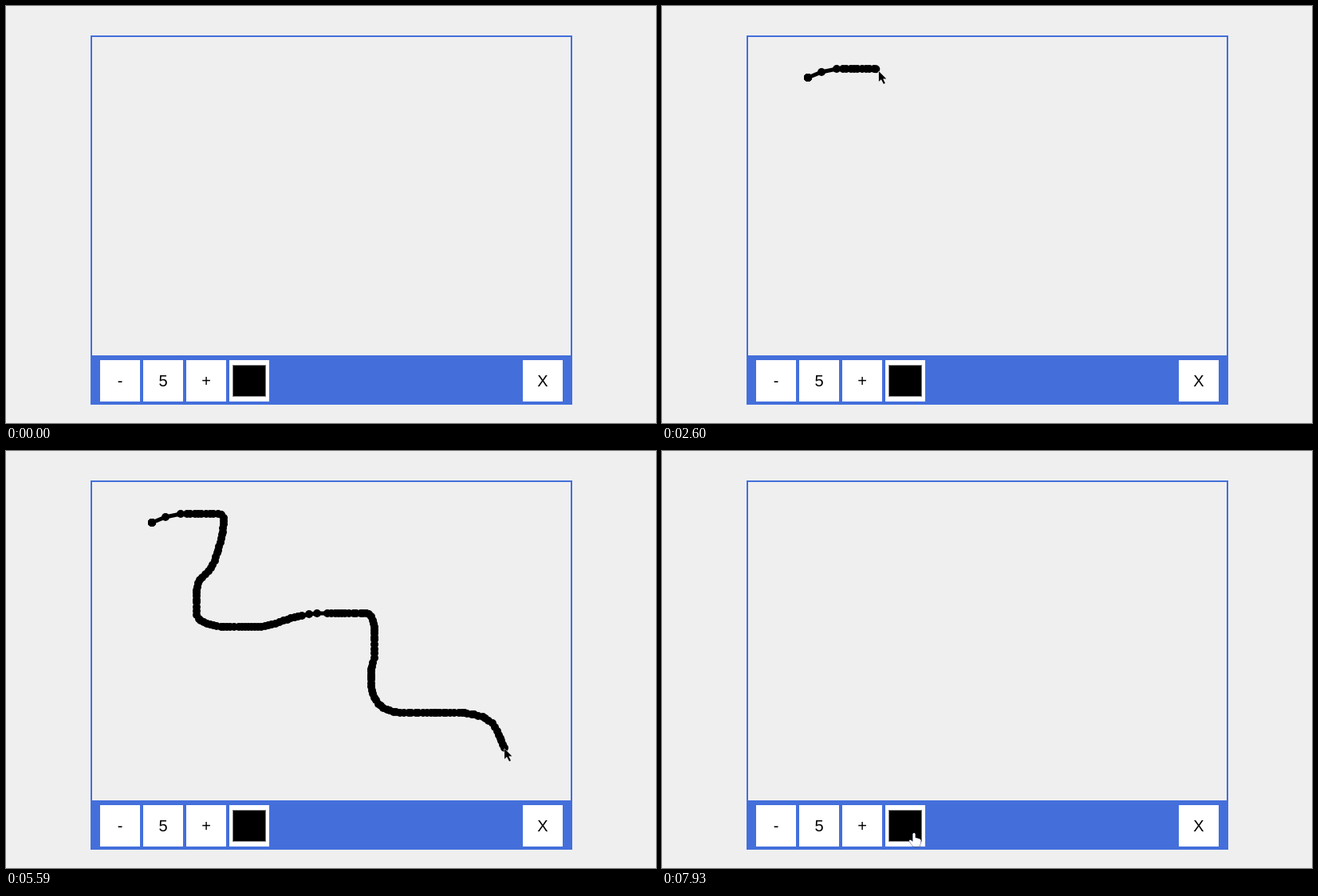
Recreate the animation shown at these times as an HTML page with a canvas. Size 815 by 524 pixels, loop 8 s.

```html
<!DOCTYPE html>
<html lang="en">
<head>
<meta charset="utf-8">
<title>Drawing board</title>
<style>
  html, body { margin: 0; width: 100%; height: 100%; overflow: hidden; background: #efefef; }
  canvas { display: block; }
</style>
</head>
<body>
<canvas width="815" height="524"></canvas>
<script>
const ctx = document.querySelector('canvas').getContext('2d');
const LOOP = 8000, STEP = 130;
const BLUE = '#446fdb', PAPER = '#efefef';
const ENTER = 1300, PEN_DOWN = 2210, PEN_UP = 5590, CLEAR = 6370;
const BUTTON = { y: 445, w: 50, h: 52 };
const BUTTONS = { '-': 118, '5': 172, '+': 226, '': 280, 'X': 648 };

const ARROW = new Path2D('M0 1V14L3 11.2L6 17L8 16L5.3 10.5H9.5Z');
const HAND = new Path2D('M-1.5 1Q0 -1 1.5 1V6L7 7.5Q9 8 8.5 11L7 17H-1L-6 10.5Q-6 8 -4 9L-1.5 11Z');

const stroke = document.createElementNS('http://www.w3.org/2000/svg', 'path');
stroke.setAttribute('d', `M183 90Q204 80 225 79H265Q273 79 273 84
  C273 105 268 118 262 137S239 155 239 179V203C239 215 257 221 277 221
  H315C340 221 355 204.5 400 204H451C457 204 462 212 462 224V257
  C462 266 458 268 458 277V295C459 310 467 328 497 329
  H562C588 329 604 334 613 346Q616 352 625 373`);
const strokeLength = stroke.getTotalLength();

function pointAt(length) {
  const { x, y } = stroke.getPointAtLength(length);
  return [x, y];
}

function seededRandom(seed) {
  return () => (seed = seed * 16807 % 2147483647) / 2147483647;
}

// Dots sit on whole pixels, a few px apart, wider where the hand moves fast
function makeDots() {
  const random = seededRandom(7);
  const burst = (s, centre, width) => Math.exp(-(((s - centre) / width) ** 4));
  const dots = [];
  for (let s = 0; s < strokeLength;) {
    dots.push({ s, at: pointAt(s).map(Math.round) });
    s += 3 + 3 * random() + 15 * burst(s, 0, 35) + 7 * burst(s, 379, 15);
  }
  return dots;
}
const dots = makeDots();

// Keys are [time, ...values]
const penKeys = [[PEN_DOWN, 0], [3250, 232], [4160, 443], [PEN_UP, strokeLength]];
const arriveKeys = [[ENTER, 150, 122], [1690, 200, 98], [2080, 184, 91]];
const leaveKeys = [[PEN_UP, 625, 373], [6240, 689, 482], [7150, 689, 482], [7930, 316, 480]];

function sample(keys, t) {
  let i = 1;
  while (i < keys.length - 1 && t > keys[i][0]) i++;
  const [t0, ...a] = keys[i - 1], [t1, ...b] = keys[i];
  const u = Math.min(1, Math.max(0, (t - t0) / (t1 - t0)));
  return a.map((v, k) => v + (b[k] - v) * u);
}

function rect(color, x, y, w, h) {
  ctx.fillStyle = color;
  ctx.fillRect(x, y, w, h);
}

function drawBoard() {
  rect(PAPER, 0, 0, 815, 524);
  rect(BLUE, 106, 37, 604, 464);
  rect(PAPER, 108, 39, 600, 400);
  ctx.font = '20px "Liberation Sans", Arial, sans-serif';
  ctx.textAlign = 'center';
  for (const [label, x] of Object.entries(BUTTONS)) {
    rect('#fff', x, BUTTON.y, BUTTON.w, BUTTON.h);
    ctx.fillStyle = '#000';
    ctx.fillText(label, x + BUTTON.w / 2, 478);
  }
  rect('#767676', 284, 451, 42, 40);
  rect('#000', 285, 452, 40, 38);
}

function drawDot([x, y]) {
  ctx.beginPath();
  ctx.arc(x, y, 5, 0, 2 * Math.PI);
  ctx.fill();
}

function drawStroke(length) {
  const points = [...dots.filter(d => d.s <= length).map(d => d.at), pointAt(length)];
  ctx.strokeStyle = ctx.fillStyle = '#000';
  ctx.lineWidth = 5;
  ctx.beginPath();
  points.forEach(p => ctx.lineTo(...p));
  ctx.stroke();
  points.forEach(drawDot);
  // The pen rests on the first dot, which darkens its edge
  for (let i = 0; i < 6; i++) drawDot(points[0]);
}

function drawCursor(x, y) {
  const onButton = y >= BUTTON.y && y < BUTTON.y + BUTTON.h &&
    Object.values(BUTTONS).some(left => x >= left && x < left + BUTTON.w);
  const shape = onButton ? HAND : ARROW;
  ctx.save();
  ctx.translate(x, y);
  ctx.lineJoin = 'round';
  ctx.lineWidth = 1;
  ctx.strokeStyle = onButton ? '#3c4a6b' : '#fff';
  ctx.fillStyle = onButton ? '#fff' : '#000';
  ctx.stroke(shape);
  ctx.fill(shape);
  ctx.restore();
}

function cursorAt(t) {
  if (t < PEN_DOWN) return sample(arriveKeys, t);
  if (t >= PEN_UP) return sample(leaveKeys, t);
  return pointAt(sample(penKeys, t)[0] + 4);
}

function draw(t) {
  drawBoard();
  if (t >= PEN_DOWN && t < CLEAR) drawStroke(sample(penKeys, t)[0]);
  if (t >= ENTER) drawCursor(...cursorAt(t));
}

function frame() {
  const t = performance.now() % LOOP;
  draw(Math.floor(t / STEP) * STEP);
  requestAnimationFrame(frame);
}
frame();
</script>
</body>
</html>
```
